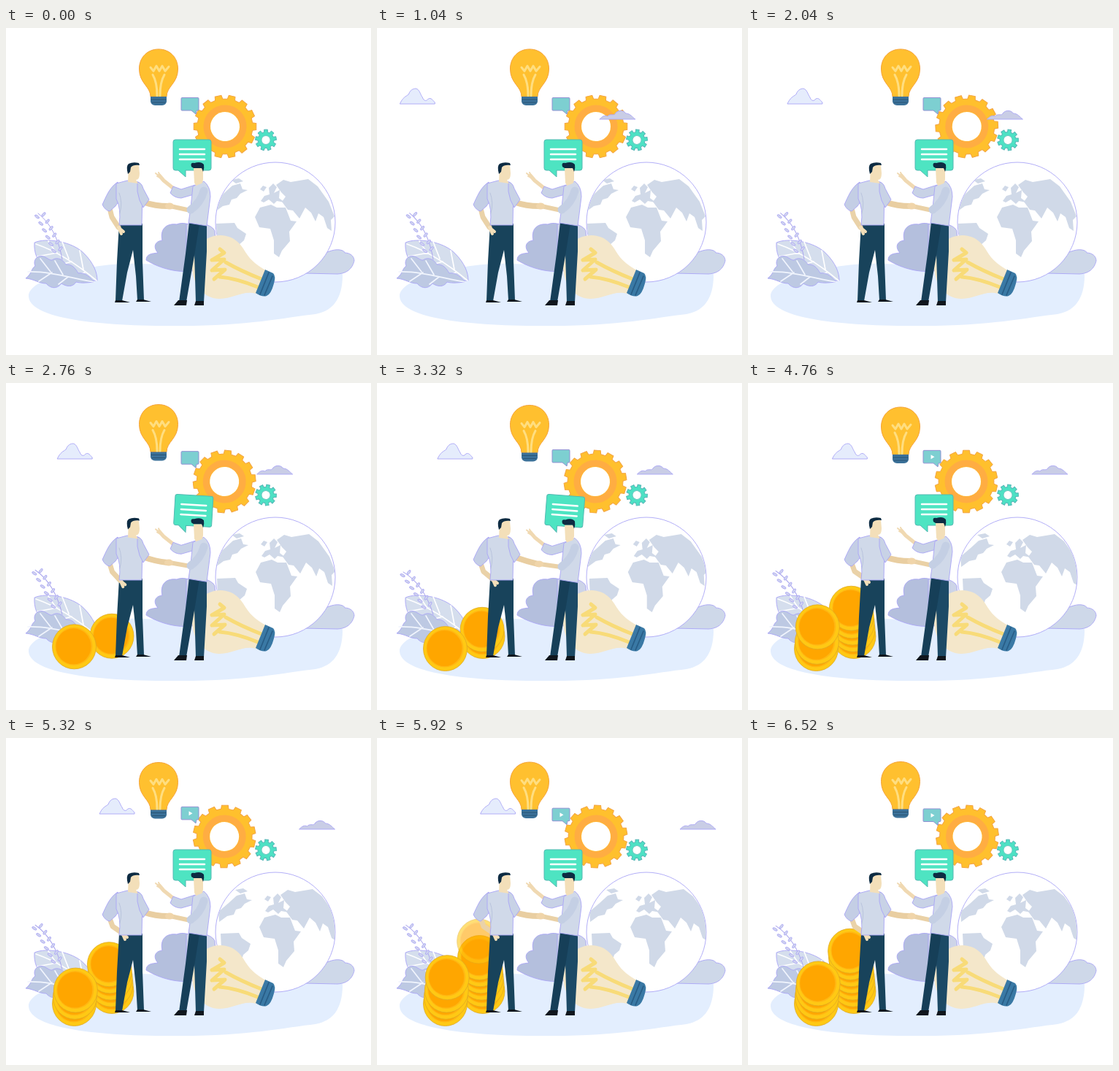
Recreate the animation shown at these times as an HTML page. Size 500 by 448 pixels, loop 6560 ms.

```html
<!DOCTYPE html>
<html lang="en">
<head>
<meta charset="utf-8">
<title>Partnership</title>
<style>
html,body{margin:0;width:100%;height:100%;overflow:hidden;background:#fff}
svg{display:block;width:500px;height:448px}
.edge{stroke:#aaa5f6;stroke-width:.9}
.line{fill:none;stroke-linejoin:round;stroke-linecap:round}
.skin{fill:#f3dfb9}
.shirt{fill:#d0d9e9}
.dark{fill:#0d2b42}
.shoe{fill:#10161d}
</style>
</head>
<body>
<svg viewBox="0 0 500 448">
<defs><clipPath id="disc"><circle cx="369" cy="266" r="81.5"/></clipPath></defs>

<path fill="#e3eefe" d="M31 367C32 346 88 332 128 326C190 317 230 330 300 326L461 334C462 365 452 387 424 392C380 397 332 408 240 408C120 409 31 397 31 367Z"/>
<path class="edge" fill="#ced8e9" d="M408 336C424 329 426 309 446 305C456 302 464 305 464 308C472 308 477 313 477 319C475 327 470 336 454 337Z"/>
<circle class="edge" cx="369" cy="266" r="82" fill="#fff"/>
<g clip-path="url(#disc)"><g id="land" fill="#d0d9e8">
  <path d="M308 208L319 206L325 210L315 213ZM299 226L310 216L321 213L324 221L331 222L321 227L316 233L309 235L306 242L297 244L286 252L285 238Z"/>
  <path d="M288 268L313 267L317 274L329 282L326 291L319 297L316 307L309 314L301 303L289 290Z"/>
  <path d="M348 221L352 216L357 218L353 224ZM349 237L354 230L361 228L360 219L366 213L371 218L367 226L375 222L374 233L382 239L371 237L367 241L360 235L353 239Z"/>
  <path d="M370 215L380 208L390 211L414 207L427 217L442 238L450 258L445 263L446 278L440 274L435 259L428 254L424 265L418 253L410 246L402 261L393 250L386 249L378 238L383 231L377 225Z"/>
  <path d="M341 259L348 246L363 242L371 246L383 246L390 264L398 265L388 279L389 292L378 305L374 314L367 309L367 291L362 275L347 273Z"/>
</g></g>
<path class="edge" fill="#b4bfdd" d="M192 318C192 309 201 309 208 308C201 300 204 292 214 291C211 278 217 267 234 269C246 264 260 272 264 281V331C238 338 210 329 192 318Z"/>
<path class="edge" fill="#cdd4e8" d="M247 269C262 263 283 270 286 278L290 325H247Z"/>

<g id="plants">
  <path class="edge" fill="#d5deed" d="M39 294C54 287 91 292 107 309C120 322 125 335 125 346C106 347 72 347 54 330C42 320 38 306 39 294Z"/>
  <path class="line" stroke="#fff" stroke-width="1.7" d="M41 296C70 306 99 325 124 346M58 292L68 307M77 293L86 316M101 305L106 331M43 313L70 308M54 330L90 320M82 343L108 335"/>
  <path class="edge" fill="#bdc9e3" d="M27 343C36 336 34 330 40 326C37 320 41 314 45 313C52 310 59 319 63 318C72 312 80 320 82 324C90 323 95 329 99 336C108 334 116 342 121 348C109 349 104 350 96 348C91 356 82 354 76 350C69 359 60 356 55 350C45 350 39 344 27 343Z"/>
  <path class="line" stroke="#f1f5fd" stroke-width="1.7" d="M30 334C61 333 94 344 121 348M47 316L61 334M67 319L78 338M45 347L63 335M72 351L85 341"/>
</g>
<g id="sprig"></g>

<g id="coins"></g>
<g id="bigGear"></g>
<g id="smallGear"></g>
<g id="clouds">
  <path class="edge" fill="#e5ecfc" d="M0 104C4 95 8 94 12 91C14 85 18 83 22 83C27 84 28 91 31 95C33 101 37 100 39 97C43 95 45 99 48 102V104Z"/>
  <path class="edge" fill="#c9cde6" transform="translate(273.5)" d="M0 125C4 121 7 119 11 121C14 117 19 120 21 118C24 112 33 112 36 117C42 117 45 122 49 125Z"/>
</g>

<g id="note">
  <path fill="#7dcfd1" stroke="#9291d4" d="M241 95.5H263Q264 95.5 264 97V112Q264 113 263 113H261L260 118L254 113H241Q240 113 240 112V97Q240 95.5 241 95.5Z"/>
  <path id="play" fill="#fff" d="M250.500 101.500L255.500 104.500L250.500 107.500Z"/>
</g>
<g id="chat">
  <path fill="#4ee4c2" stroke="#52b9b2" d="M232 153H278Q281 153 281 156V192Q281 195 278 195H246V204L236 195H232Q229 195 229 192V156Q229 153 232 153Z"/>
  <path class="line" stroke="#fff" stroke-width="2.5" d="M238 166H272M238 173H272M238 180H272"/>
</g>
<g id="bulb">
  <path fill="#ffc02f" stroke="#f5a33a" d="M198 94C198 80 182.500 76 182.500 56C182.500 40 194 29 209 29S235.500 40 235.500 56C235.500 76 220 80 220 94Z"/>
  <path class="line" stroke="#ffde80" stroke-width="3" d="M198 54L202 59L206 52L210 59L214 52L218 59L223 53M201 64Q207 74 207 93M217 64Q211 74 211 93"/>
  <path fill="#3b7199" d="M198 94H220V101Q219 105.500 214 106H204Q199 105.500 198 101Z"/>
  <path class="line" stroke="#285474" d="M199 98H219M200 102H218"/>
</g>

<g id="lyingBulb">
  <path fill="#f4e7ca" d="M255 330C253 303 271 284 294 284C313 285 321 295 328 307C336 320 347 327 356 332L343 364C324 359 315 370 292 371C273 371 257 355 255 330Z"/>
  <path class="line" stroke="#f8db78" stroke-width="5" d="M293 303L299 308L282 318L299 317L282 332L300 331L285 344M293 341Q316 343 345 355M301 321Q322 333 350 344"/>
  <path fill="#3a79a5" d="M355 331L366 336Q370 340 367 350Q363 365 357 367Q351 369 342 363Z"/>
  <path class="line" stroke="#285d86" stroke-width="1.700" d="M360 335L348 365M365 340L354 366"/>
</g>

<g id="leftMan">
  <path fill="#18435b" d="M155 268H187L187 320L189 373H180L178 340L174 304L166 335L159 374H150L152 320Z"/>
  <path class="shoe" d="M150 373H159L170 376H149ZM180 372H188L199 375H178Z"/>
  <path class="line" id="hipArm" stroke="#ead2a8" stroke-width="7"/>
  <path class="line" id="hipHand" stroke="#f3dfb9" stroke-width="4"/>
  <path class="edge" fill="#c4cee5" d="M153 211C142 218 137 231 132 242Q136 250 142 251L150 244L158 232Z"/>
  <path class="line" id="leftArm" stroke="#e9cea1" stroke-width="8"/>
  <path class="edge shirt" d="M151 213L166 209L181 211Q187 214 187 222L186 270H155Q158 247 151 234Z"/>
  <path class="edge" fill="#c8d2e6" d="M180 211Q186 212 188 220L196 235L188 246Q182 237 180 224Z"/>
  <path class="line" stroke="#b9c4dd" d="M155 226Q160 239 156 254"/>
  <g id="leftHead">
    <path class="skin" d="M168 188H182L183 199Q183 208 178 208L181 213L167 211Z"/>
    <path class="dark" d="M167 200Q164 189 168 186Q174 183 182 185L183 188Q174 187 171 191L170 197Z"/>
  </g>
</g>

<g id="rightMan">
  <path fill="#1c4a66" d="M251 266L275 268V306L271 376H260L258 309Z"/>
  <path fill="#163f58" d="M251 266L265 268L258 312L247 375H237L246 309Z"/>
  <path class="shoe" d="M236 373H248L247 380H230ZM260 374H271V380H258Z"/>
  <g id="rightTop">
    <path class="line" stroke="#f0d9b2" stroke-width="5" d="M210 202L216 209L231 221"/>
    <path class="line" stroke="#f0d9b2" stroke-width="2" d="M205 199L211 204M209 198L212 204M207 203L212 206"/>
    <path class="edge" fill="#c8d2e6" d="M229 217L240 221L259 215L261 227L240 233Q231 233 225 226Z"/>
    <path class="edge shirt" d="M256 217L271 210Q280 217 280 231L275 271L250 267L253 246Z"/>
    <path class="skin" d="M257 192H270V207Q270 211 268 213L260 216L258 212Z"/>
    <path class="dark" d="M254 190Q252 184 258 185Q267 182 271 187Q272 192 270 197L268 192H257Z"/>
  </g>
  <path class="line" id="rightArm" stroke="#ead1a6" stroke-width="6"/>
  <path class="line" id="rightSleeve" stroke="#c4cfe4" stroke-width="11"/>
  <ellipse id="grip" rx="6" ry="4.500" fill="#f0d5aa"/>
</g>
</svg>
<script>
const LOOP = 6560, STEP = 40;
const $ = id => document.getElementById(id);
const set = (id, name, value) => $(id).setAttribute(name, value);

// Smooth interpolation through time/value pairs.
function track(t, ...keys) {
  if (t <= keys[0][0]) return keys[0][1];
  for (let i = 1; i < keys.length; i++) {
    const [a, v] = keys[i - 1], [b, w] = keys[i];
    if (t <= b) {
      const p = (t - a) / (b - a);
      return v + (w - v) * p * p * (3 - 2 * p);
    }
  }
  return keys[keys.length - 1][1];
}

function gearPath(teeth, outer, root) {
  const slot = Math.PI * 2 / teeth, points = [];
  for (let i = 0; i < teeth; i++)
    for (const [f, r] of [[-.31, root], [-.23, outer], [.23, outer], [.31, root]]) {
      const a = (i + f) * slot;
      points.push((r * Math.sin(a)).toFixed(2) + ' ' + (-r * Math.cos(a)).toFixed(2));
    }
  return 'M' + points.join('L') + 'Z';
}

$('bigGear').innerHTML = `<path d="${gearPath(14, 43, 38)}" fill="#ffc02d" stroke="#f3a442"/>
  <circle r="25" fill="none" stroke="#ffad42" stroke-width="9"/><circle r="20" fill="#fff"/>`;
$('smallGear').innerHTML = `<path d="${gearPath(9, 14.5, 11)}" fill="#4de1c4" stroke="#55b5b6"/>
  <circle r="6" fill="#fff" stroke="#70c8c2"/>`;

let sprig = '<path class="line" stroke="#aaa6ee" d="M77 317C73 294 64 270 44 254"/>';
for (let i = 0; i < 6; i++) {
  const p = i / 5, x = 47 + 27 * p - 4 * p * p, y = 257 + 47 * p;
  for (const side of [-1, 1]) {
    const cx = x + side * 4.5, cy = y - side * 1.5;
    sprig += `<ellipse cx="${cx}" cy="${cy}" rx="3.5" ry="1.6" fill="#d0d4ef" stroke="#aaa5f6" stroke-width=".8" transform="rotate(${side < 0 ? 35 : -48} ${cx} ${cy})"/>`;
  }
}
$('sprig').innerHTML = sprig;

const FALL = 500, DROP = 14;
const stacks = [
  {x: 145, y: 347, dx: -.9, times: [2300, 2800, 3400, 3900, 4360, 5400, 5850]},
  {x: 93.5, y: 364, dx: .9, times: [2400, 3600, 4620, 5700]}
];
const coins = stacks.flatMap(s => s.times.map((start, i) => {
  const node = document.createElementNS('http://www.w3.org/2000/svg', 'g');
  node.innerHTML = `<ellipse rx="30" ry="30.5" fill="#ffc914" stroke="#dfa923" stroke-width=".8"/>
    <ellipse cx="-.5" cy="-.5" rx="25.5" ry="26" fill="#ffb713"/>
    <ellipse cx="-1" cy="-.5" rx="24" ry="24.5" fill="#ffa600"/>`;
  $('coins').append(node);
  return {node, start, x: s.x + i * s.dx, y: s.y - i * 9.2};
}));

function draw(t) {
  const visible = t >= 240 && t <= 6240;
  set('clouds', 'visibility', visible ? 'visible' : 'hidden');
  set('clouds', 'transform', `translate(${7.8 + t * .0226})`);

  for (const c of coins) {
    const p = track(t, [c.start, 0], [c.start + FALL, 1]);
    c.node.setAttribute('visibility', t >= c.start ? 'visible' : 'hidden');
    c.node.setAttribute('opacity', Math.min(1, (t - c.start) / 120));
    c.node.setAttribute('transform', `translate(${c.x} ${c.y - DROP * (1 - p)})`);
  }

  const sway = track(t, [0, 0], [1600, .8], [2100, .6], [3400, -7.7], [3900, -8], [5600, -3.3], [6520, -5.5]);
  set('sprig', 'transform', `rotate(${sway} 77 317)`);
  set('land', 'transform', `translate(${track(t, [2040, 0], [4760, 6], [6520, 6])})`);
  set('bulb', 'transform', `translate(0 ${track(t, [2040, 0], [5440, 4.5], [6520, 3.5])})`);
  set('note', 'transform', `translate(0 ${track(t, [2040, 0], [3800, -5], [6520, 1.5])})`);
  set('play', 'opacity', track(t, [4080, 0], [4480, 1]));
  set('chat', 'transform', `rotate(${track(t, [2250, 0], [3000, 4.5], [3880, 4], [4560, 0])} 240 204)`);
  const turn = track(t, [700, 13], [4760, 0], [6520, 4]);
  const drift = track(t, [1400, 0], [3320, -1], [5000, -1], [6520, .5]);
  set('bigGear', 'transform', `translate(${300 + drift} 135) rotate(${turn})`);
  set('smallGear', 'transform', `translate(356 153.5) rotate(${track(t, [0, 0], [3300, 14], [6520, 0])})`);

  const bob = track(t, [2250, 0], [3250, 1], [3880, .5], [4560, 0]);
  const hip = track(t, [2080, 0], [3320, .8], [4100, 1]);
  const hx = 224 - 2 * bob, hy = 244 + 4 * bob;
  const wx = 159 + 5 * hip, wy = 279 - 6 * hip;
  set('hipArm', 'd', `M142 247L${145 + hip} ${259 - hip}L${wx - 5} ${wy - 6}`);
  set('hipHand', 'd', `M${wx - 5} ${wy - 6}L${wx - 1} ${wy + 3}M${wx - 4} ${wy - 5}L${wx + 2} ${wy}`);
  set('leftArm', 'd', `M190 239Q204 244 ${hx - 2} ${hy}`);
  set('leftHead', 'transform', `translate(0 ${bob})`);

  const lift = 2.5 * bob;
  set('rightTop', 'transform', `translate(0 ${lift})`);
  set('rightArm', 'd', `M${hx + 1} ${hy}L248 ${249 + lift}`);
  set('rightSleeve', 'd', `M271 ${223 + lift}Q267 ${239 + lift} 253 ${249 + lift}`);
  set('grip', 'cx', hx);
  set('grip', 'cy', hy);
}

const began = performance.now();
function frame() {
  const t = (performance.now() - began) % LOOP;
  draw(Math.floor(t / STEP) * STEP);
  requestAnimationFrame(frame);
}
draw(0);
requestAnimationFrame(frame);
</script>
</body>
</html>
```
